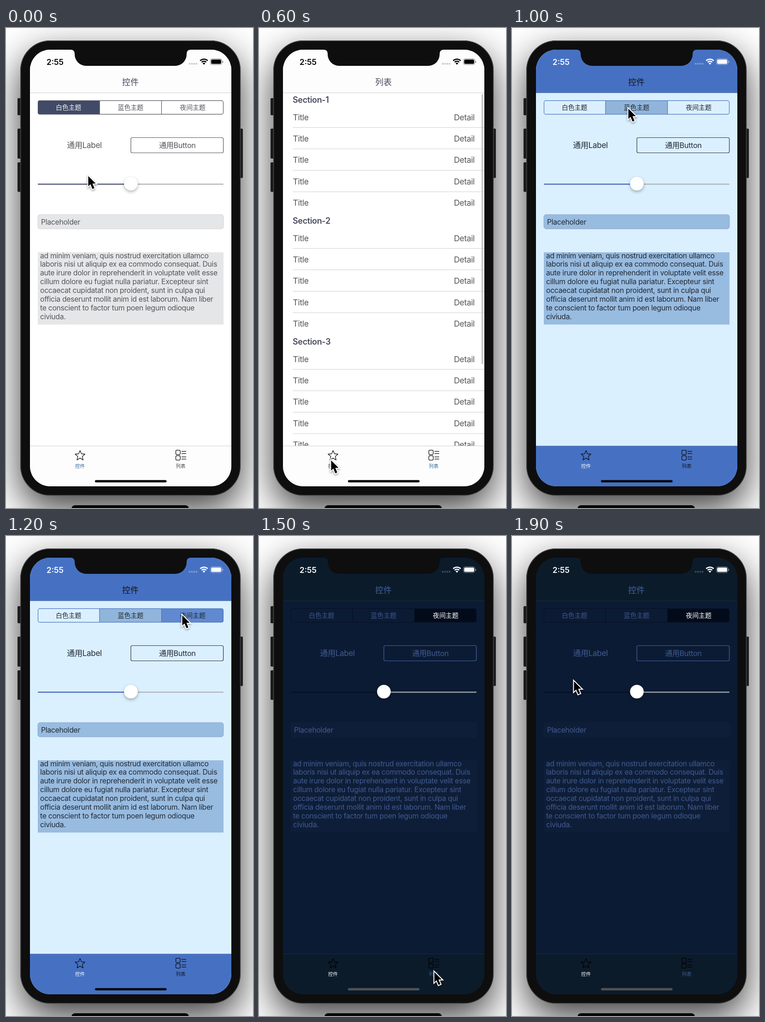
Animation, 536 px wide and 1040 px high, one loop 2 s. Source, as an HTML page with a canvas:

```html
<!DOCTYPE html>
<html lang="zh">
<head>
<meta charset="utf-8">
<title>Theme switching</title>
<style>
html, body { margin: 0; width: 100%; height: 100%; overflow: hidden; background: #fff; }
canvas { display: block; width: 536px; height: 1040px; }
</style>
</head>
<body>
<canvas id="stage" width="536" height="1040"></canvas>
<script>
const ctx = document.getElementById('stage').getContext('2d');
const FONT = 'Inter, "Noto Sans CJK SC", "Noto Sans CJK", sans-serif';
const LOOP = 2000, STEP = 100;

const WHITE = {
  bg: '#fff', nav: '#fdfdfd', line: '#d0d0d2', title: '#454859', text: '#55565c', status: '#000',
  seg: '#54565f', segText: '#55565c', selFill: '#414a66', selText: '#f2f2f5',
  button: '#54565f', track: '#474a72', rest: '#b1b1b3', field: '#e5e6e7', fieldLine: '#d3d4d6',
  tab: '#444', tabOn: '#2f6399', icon: '#151515', home: '#000', section: '#484a5e', dots: '#c9c9cb'
};
const BLUE = {
  bg: '#dbf0fe', nav: '#4671c3', line: '#7189b5', title: '#12161c', text: '#222a35', status: '#fff',
  seg: '#4a74c4', segText: '#1f2833', selFill: '#91b5da', selText: '#1f2833', press: '#6189cf',
  button: '#2b323c', track: '#3f62bd', rest: '#adb1b8', field: '#98bbe0', fieldLine: '#8caccd',
  tab: '#10151c', tabOn: '#fff', icon: '#0c1016', home: '#06080c', section: '#12161c', dots: '#7c9bd4'
};
const NIGHT = {
  bg: '#0c1b34', nav: '#0c1b2a', line: '#1a2a3f', title: '#42619a', text: '#3f5b90', status: '#fff',
  seg: '#061025', segText: '#3c5789', selFill: '#030b1a', selText: '#fff',
  button: '#4564a0', track: '#050f22', rest: '#acafb3', field: '#0f1e38', fieldLine: '#12213b',
  tab: '#3d5f9a', tabOn: '#fff', icon: '#000', home: '#505356', section: '#42619a', dots: '#3d4a5a'
};

// Each scene holds from its start time until the next one.
const scenes = [
  { at: 0, theme: WHITE, sel: 0 },
  { at: 400, theme: WHITE, list: true },
  { at: 700, theme: WHITE, sel: 0 },
  { at: 900, theme: WHITE, sel: 1, muted: true },
  { at: 1000, theme: BLUE, sel: 1 },
  { at: 1200, theme: BLUE, sel: 1, press: 2 },
  { at: 1300, theme: NIGHT, sel: 2 },
  { at: 1600, theme: NIGHT, list: true },
  { at: 1800, theme: NIGHT, sel: 2 }
];
const pointer = [
  [0, 176, 316], [300, 382, 934], [400, 382, 934], [600, 154, 932], [700, 154, 932],
  [900, 250, 170], [1000, 250, 170], [1200, 380, 167], [1300, 380, 167],
  [1500, 378, 940], [1600, 378, 940], [1700, 154, 934], [1900, 132, 310]
];
const story = [
  'ad minim veniam, quis nostrud exercitation ullamco',
  'laboris nisi ut aliquip ex ea commodo consequat. Duis',
  'aute irure dolor in reprehenderit in voluptate velit esse',
  'cillum dolore eu fugiat nulla pariatur. Excepteur sint',
  'occaecat cupidatat non proident, sunt in culpa qui',
  'officia deserunt mollit anim id est laborum. Nam liber',
  'te conscient to factor tum poen legum odioque',
  'civiuda.'
];

function rect(x, y, w, h, color) {
  ctx.fillStyle = color;
  ctx.fillRect(x, y, w, h);
}
function box(x, y, w, h, r, fill, stroke, width = 1) {
  ctx.beginPath();
  ctx.roundRect(x, y, w, h, r);
  if (fill) { ctx.fillStyle = fill; ctx.fill(); }
  if (stroke) { ctx.strokeStyle = stroke; ctx.lineWidth = width; ctx.stroke(); }
}
function disc(x, y, r, color) {
  ctx.beginPath();
  ctx.arc(x, y, r, 0, 7);
  ctx.fillStyle = color;
  ctx.fill();
}
// y is the middle of the capitals
function text(str, x, y, size, color, align = 'left', weight = 400) {
  ctx.font = `${weight} ${size}px ${FONT}`;
  ctx.letterSpacing = /[a-z]/.test(str) ? `${-0.02 * size}px` : '0px';
  ctx.textAlign = align;
  ctx.fillStyle = color;
  ctx.fillText(str, x, y + 0.37 * size);
}
function withShadow(color, blur, dy, draw) {
  ctx.save();
  ctx.shadowColor = color;
  ctx.shadowBlur = blur;
  ctx.shadowOffsetY = dy;
  draw();
  ctx.restore();
}

function drawPhone() {
  rect(0, 0, 536, 1040, '#fff');
  withShadow('rgba(0,0,0,.76)', 80, 30, () => box(31, 27, 478, 986, 65, '#000'));
  box(142, 1034, 255, 20, 8, '#060606');
  for (const [x, y, h] of [[25, 152, 37], [25, 218, 65], [25, 291, 64], [506, 218, 107]])
    box(x, y, 8, h, 2, '#1c1c1c');
  box(31.8, 27.8, 476.7, 984.7, 64, '#0e0e0e', '#484848', 1.4);
}

function drawNotch() {
  ctx.beginPath();
  ctx.moveTo(140, 46);
  ctx.lineTo(140, 47);
  ctx.quadraticCurveTo(149, 47, 149, 56);
  ctx.arcTo(149, 82, 175, 82, 25);
  ctx.arcTo(392, 82, 392, 57, 25);
  ctx.lineTo(392, 56);
  ctx.quadraticCurveTo(392, 47, 401, 47);
  ctx.lineTo(401, 46);
  ctx.fillStyle = '#0e0e0e';
  ctx.fill();
}

function drawStatus(c) {
  text('2:55', 106.5, 73.5, 17, c.status, 'center', 600);
  for (let i = 0; i < 4; i++) disc(398.5 + i * 5, 77.5, 2, c.dots);
  ctx.strokeStyle = c.status;
  ctx.lineWidth = 2.6;
  for (const r of [7, 11.5]) {
    ctx.beginPath();
    ctx.arc(429.5, 79, r, -Math.PI * 0.75, -Math.PI * 0.25);
    ctx.stroke();
  }
  ctx.beginPath();
  ctx.moveTo(429.5, 79.5);
  ctx.arc(429.5, 79.5, 4.2, -Math.PI * 0.75, -Math.PI * 0.25);
  ctx.fillStyle = c.status;
  ctx.fill();
  ctx.globalAlpha = 0.45;
  box(443.5, 66.5, 25, 13, 4, null, c.status);
  box(469.5, 71, 1.7, 4.5, 1, c.status);
  ctx.globalAlpha = 1;
  box(445.2, 68.2, 21.6, 9.6, 2.5, c.status);
}

function drawTabs(c, list) {
  rect(52, 905, 437, 88, c.nav);
  rect(52, 905, 437, 1, c.line);
  ctx.strokeStyle = c.icon;
  ctx.lineWidth = 1.3;
  ctx.lineJoin = 'round';
  ctx.beginPath();
  for (let i = 0; i < 10; i++) {
    const r = i % 2 ? 5.2 : 11.3, a = i * Math.PI / 5;
    ctx.lineTo(160.7 + r * Math.sin(a), 926.7 - r * Math.cos(a));
  }
  ctx.closePath();
  ctx.stroke();
  for (const y of [914.7, 926.7]) {
    box(368.5, y, 9.6, 9.6, 2.5, null, c.icon, 1.3);
    rect(381, y + 2, 10, 1.3, c.icon);
    rect(381, y + 6.6, 10, 1.3, c.icon);
  }
  text('控件', 160.5, 949.5, 10.5, list ? c.tab : c.tabOn, 'center', 500);
  text('列表', 379, 949.5, 10.5, list ? c.tabOn : c.tab, 'center', 500);
  box(193, 979.5, 155.5, 5, 2.5, c.home);
}

function drawControls(c, scene) {
  const { sel, press, muted } = scene;
  ctx.save();
  ctx.beginPath();
  ctx.roundRect(69, 157, 403, 30, 4);
  ctx.clip();
  const left = i => 68.5 + i * 134.5;
  rect(left(sel), 157, 135, 30, c.selFill);
  if (press) rect(left(press), 157, 135, 30, c.press);
  ctx.restore();
  box(69.5, 157.4, 402, 29.5, 4, null, c.seg, 1.2);
  for (const i of [1, 2]) rect(left(i) - 0.6, 157, 1.2, 30, c.seg);
  ['白色主题', '蓝色主题', '夜间主题'].forEach((label, i) => {
    if (muted && i === sel) return;
    text(label, 135.7 + i * 134.7, 172, 13.9, i === sel ? c.selText : c.segText, 'center');
  });

  text('通用Label', 170, 254, 17.1, c.text, 'center');
  box(271, 237.5, 200.6, 33, 3, null, c.button, 1.2);
  text('通用Button', 371.7, 254, 16.2, c.text, 'center');

  box(69, 337.2, 202, 2.2, 1, c.track);
  box(271, 337.2, 201, 2.2, 1, c.rest);
  withShadow('rgba(0,0,0,.3)', 7, 3, () => disc(271, 337.3, 14.8, '#fff'));

  box(69, 404.2, 403, 31, 5, c.field, c.fieldLine);
  text('Placeholder', 76, 420, 15.8, c.text);

  ctx.save();
  ctx.beginPath();
  ctx.rect(69, 486, 403, 156.5);
  ctx.clip();
  rect(69, 486, 403, 157, c.field);
  story.forEach((line, i) => text(line, 74, 492.7 + i * 18.92, 15.8, c.text));
  ctx.restore();
}

function drawList(c) {
  ctx.save();
  ctx.beginPath();
  ctx.rect(52, 140, 437, 765);
  ctx.clip();
  for (let s = 0; s < 3; s++) {
    const top = 155 + s * 262;
    text(`Section-${s + 1}`, 73, top, 18, c.section, 'left', 600);
    for (let r = 0; r < 5; r++) {
      const y = top + 38 + r * 46.45;
      text('Title', 73.5, y, 17.6, c.text);
      text('Detail', 468, y, 17.6, c.text, 'right');
      if (r < 4) rect(73, y + 22, 416, 1, c.line);
    }
  }
  box(483, 143, 3, 585, 1.5, c === NIGHT ? '#59616f' : '#c2c2c4');
  ctx.restore();
}

function drawPointer(t) {
  const last = pointer.length - 1;
  let i = 0;
  while (i < last && pointer[i + 1][0] <= t) i++;
  const [t0, x0, y0] = pointer[i], [t1, x1, y1] = pointer[Math.min(i + 1, last)];
  const u = t1 > t0 ? (t - t0) / (t1 - t0) : 0, e = u * u * (3 - 2 * u);
  ctx.save();
  ctx.translate(x0 + (x1 - x0) * e, y0 + (y1 - y0) * e);
  const arrow = new Path2D('M2.5 4.8V27L7.3 22.5L11.6 32.8L15.8 31L11.6 21H18.7Z');
  ctx.lineJoin = 'miter';
  ctx.lineWidth = 4;
  ctx.strokeStyle = '#fff';
  withShadow('rgba(0,0,0,.4)', 4, 2, () => ctx.stroke(arrow));
  ctx.fillStyle = '#000';
  ctx.fill(arrow);
  ctx.restore();
}

function draw(t) {
  const scene = scenes.filter(s => s.at <= t).pop();
  const c = scene.theme;
  drawPhone();
  ctx.save();
  ctx.beginPath();
  ctx.roundRect(52, 47, 437, 946, 44);
  ctx.clip();
  rect(52, 47, 437, 946, c.bg);
  rect(52, 47, 437, 93, c.nav);
  rect(52, 140, 437, 1, c.line);
  text(scene.list ? '列表' : '控件', 270, 117, 18, c.title, 'center', 500);
  if (scene.list) drawList(c);
  else drawControls(c, scene);
  drawTabs(c, scene.list);
  drawStatus(c);
  drawNotch();
  ctx.restore();
  drawPointer(t);
}

const start = performance.now();
function tick() {
  const t = (performance.now() - start) % LOOP;
  draw(Math.floor(t / STEP) * STEP);
  requestAnimationFrame(tick);
}
tick();
</script>
</body>
</html>
```
